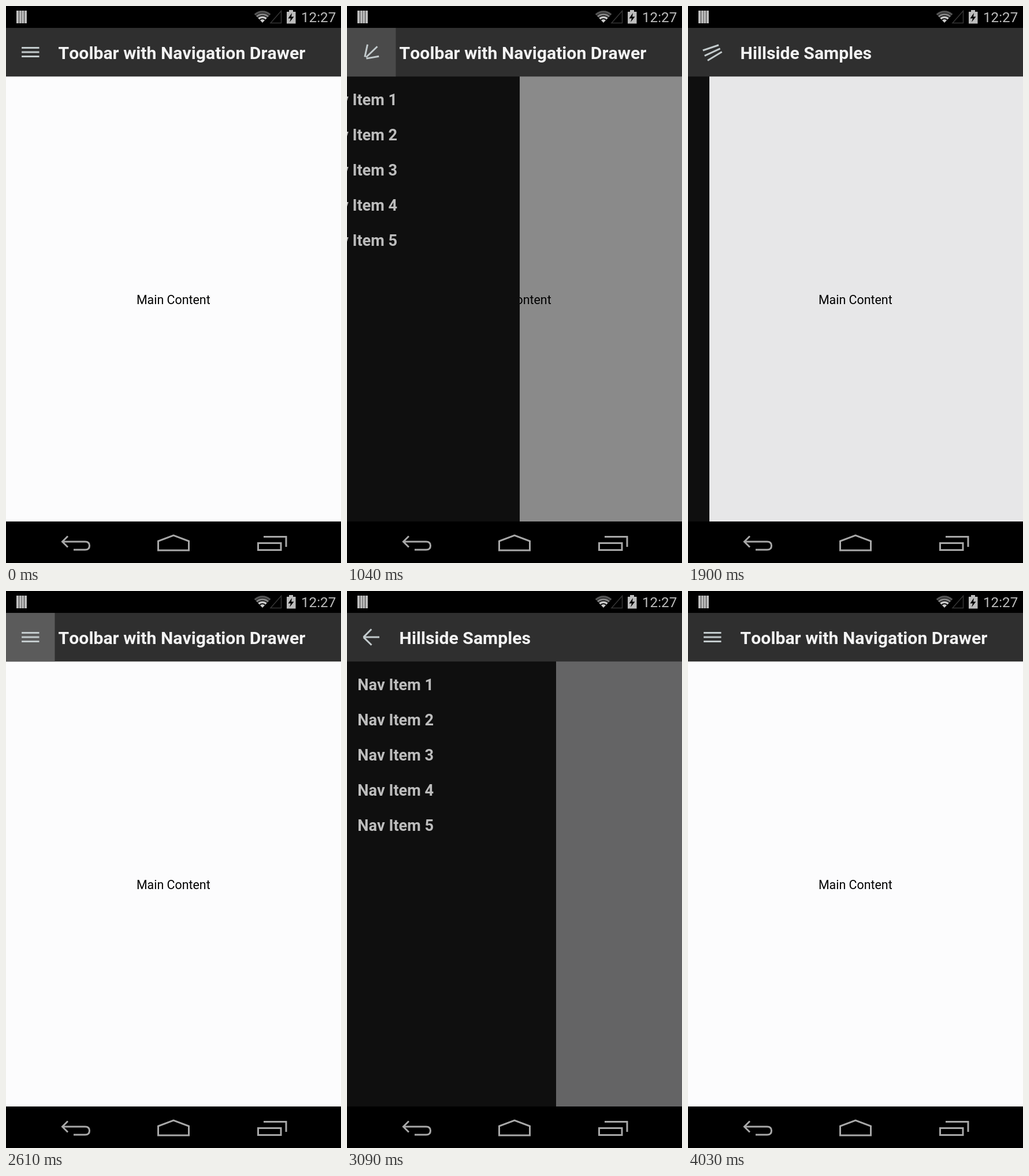
These frames come from a looping animation (580 by 966 pixels, 4070 ms). An HTML page:

```html
<!DOCTYPE html>
<html lang="en">
<head>
<meta charset="utf-8">
<title>Navigation drawer</title>
<style>
  html, body { margin: 0; height: 100%; overflow: hidden; background: #000; }
  svg { display: block; width: 100vw; height: 100vh; }
  text { font-family: Roboto, sans-serif; font-kerning: none; }
  .title { font-size: 30.2px; font-weight: 700; fill: #f3f3f3; }
  .item { font-size: 27.2px; font-weight: 700; fill: #bdbdbd; }
  .line { fill: none; stroke: #a8a8a8; stroke-width: 3; }
  .wifi { fill: none; stroke-width: 3.6; }
</style>
</head>
<body>
<svg viewBox="0 0 580 966">
  <!-- content -->
  <rect y="122" width="580" height="772" fill="#fcfcfd"/>
  <text x="289.8" y="516.5" font-size="21.4" text-anchor="middle">Main Content</text>
  <rect id="scrim" y="122" width="580" height="772"/>
  <g id="drawer">
    <rect y="122" width="362" height="772" fill="#0f0f0f"/>
  </g>

  <!-- toolbar -->
  <rect y="37.8" width="580" height="84.5" fill="#2f2f2f"/>
  <rect id="press" y="37.8" width="84.5" height="84.5" fill="#5b5b5b"/>
  <path id="icon" fill="none" stroke="#c3cbcd" stroke-width="3"/>
  <text id="title" class="title" x="90.6" y="92"></text>

  <!-- status bar -->
  <rect width="580" height="37.8"/>
  <path d="M20 8v22M24.7 8v22M29.3 8v22M34 8v22" stroke="#bdbdbd" stroke-width="4"/>
  <path class="wifi" stroke="#555" d="M430.900 15.200A19 19 0 0 1 457.100 15.200"/>
  <path class="wifi" stroke="#808080" d="M434 18.500A14.500 14.500 0 0 1 454 18.500"/>
  <path class="wifi" stroke="#c8c8c8" d="M437.400 22.100A9.500 9.500 0 0 1 450.600 22.100"/>
  <path fill="#c8c8c8" d="M444 29L439.900 24.700A6 6 0 0 1 448.100 24.700Z"/>
  <path d="M476.500 8.500V29.500H458Z" fill="none" stroke="#353535" stroke-width="1.5"/>
  <path d="M486 10h4v-3h7v3h4.500v20.500h-15.500z" fill="#bdbdbd"/>
  <path d="M495 12L488.500 21.500H493L491 28L498.500 18.500H494Z"/>
  <text x="511" y="28" font-size="24.2" fill="#bdbdbd">12:27</text>

  <!-- navigation bar -->
  <rect y="894" width="580" height="72"/>
  <path class="line" d="M107 919.500L97.500 929L107 938.500M98 929H137Q144.500 929 144.500 936T137 943H117"/>
  <path class="line" d="M263.500 944V928L290 918L316.500 928V944Z"/>
  <path class="line" d="M436.500 931.500H476V943.500H436.500ZM446 920.500H485V938"/>
</svg>
<script>
const LOOP = 4070, WIDTH = 362, SLIDE_LAG = 25, DRAG = 150;
const cycles = [
  { press: 820, opened: 1270, drag: 1640, closed: 2120 },
  { press: 2610, opened: 3090, drag: 3540, closed: 4030 },
];
const el = id => document.getElementById(id);
const lerp = (a, b, k) => a + (b - a) * k;
const clamp = v => Math.min(1, Math.max(0, v));
const remaining = k => (1 - clamp(k)) ** 5;

for (let i = 1; i <= 5; i++) {
  el("drawer").insertAdjacentHTML("beforeend",
    `<text class="item" x="18.2" y="${110.3 + 61.2 * i}">Nav Item ${i}</text>`);
}

// Visible drawer width: a tap settles it open, a swipe drags it and lets it settle shut.
function drawerWidth(t, c) {
  if (!c || t >= c.closed) return 0;
  if (t < c.drag) return WIDTH * (1 - remaining((t - c.opened + 380) / 512));
  const dragged = t - c.drag;
  return dragged < DRAG ? lerp(319, 128, dragged / DRAG) : 128 * remaining((dragged - DRAG) / 505);
}

// Three bars turning into a back arrow as p goes from 0 to 1.
function drawIcon(p, closing) {
  const size = lerp(30.4, 27.5, p), left = -size / 2;
  const gap = lerp(7.6, 0, p), cut = 2 * p;
  const arm = lerp(30.4, 19.5, p), angle = p * Math.PI / 4;
  const dx = arm * Math.cos(angle), dy = arm * Math.sin(angle);
  const turn = lerp(180, 0, p) * (closing ? 1 : -1);
  el("icon").setAttribute("d",
    `M${left + cut} 0h${size - cut}M${left} ${gap}l${dx} ${dy}M${left} ${-gap}l${dx} ${-dy}`);
  el("icon").setAttribute("transform", `translate(42.3 80) rotate(${turn})`);
}

function render(t) {
  const c = cycles.findLast(c => t >= c.press);
  const width = Math.round(drawerWidth(t, c));
  const slide = c && t >= c.closed ? 0 : drawerWidth(t - SLIDE_LAG, c) / WIDTH;
  const isOpen = c && t >= c.opened && t < c.closed;

  el("drawer").setAttribute("transform", `translate(${width - WIDTH})`);
  el("scrim").setAttribute("opacity", 0.6 * slide);
  el("press").setAttribute("opacity", c ? 1 - clamp((t - c.opened + 380) / 380) : 0);
  el("title").textContent = isOpen ? "Hillside Samples" : "Toolbar with Navigation Drawer";
  drawIcon(slide, c && t >= c.drag);
}

const start = performance.now();
function tick() {
  render((performance.now() - start) % LOOP);
  requestAnimationFrame(tick);
}
tick();
</script>
</body>
</html>
```
